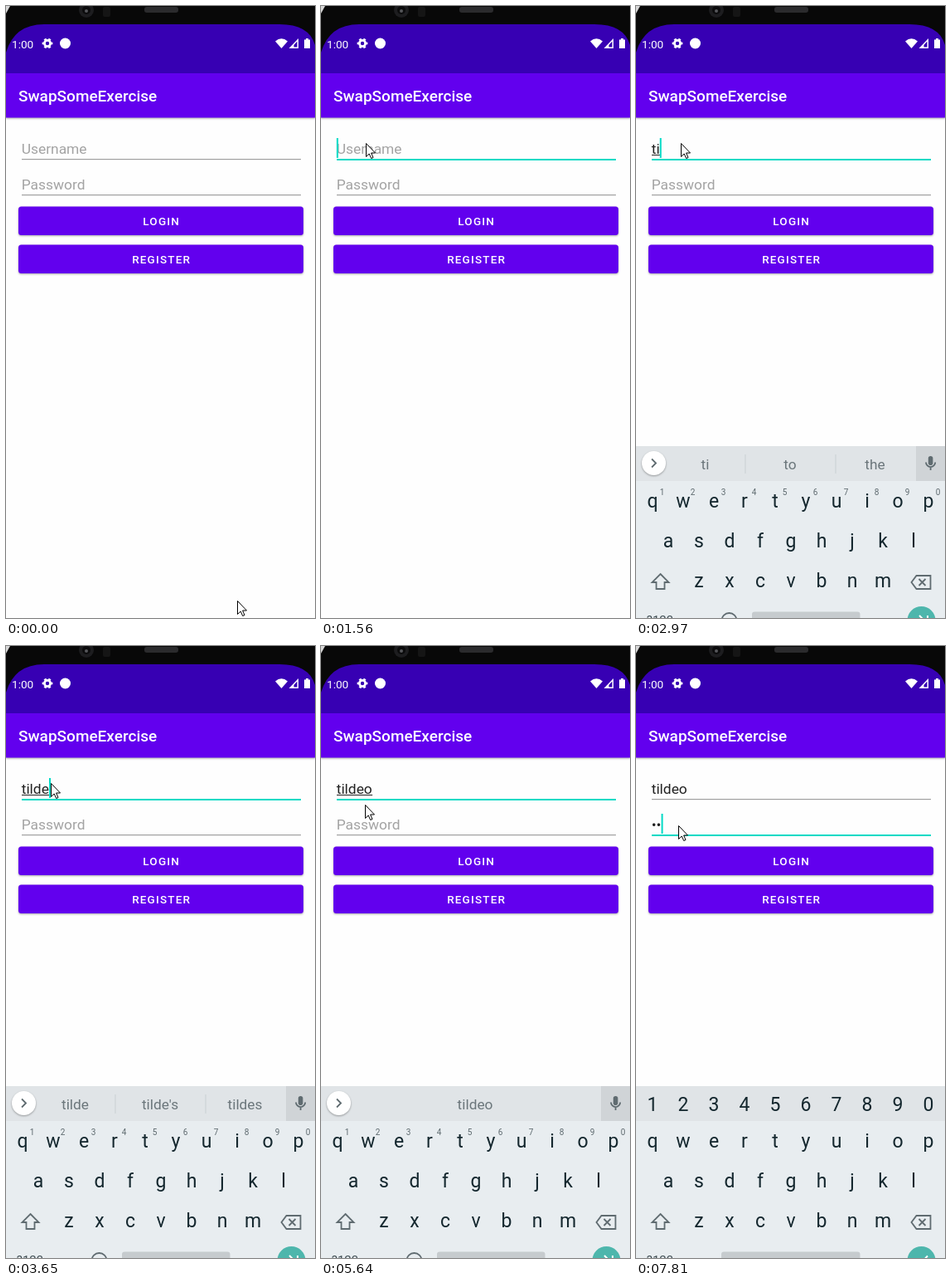
Recreate the animation shown at these times as an HTML page. Size 373x737 px, loop 8000 ms.

```html
<!DOCTYPE html>
<html lang="en">
<head>
<meta charset="utf-8">
<title>Login form</title>
<style>
html, body { margin: 0; width: 100%; height: 100%; overflow: hidden; background: #fefefe; }
svg { display: block; font-family: Roboto, sans-serif; }
text { white-space: pre; }
.mid { text-anchor: middle; }
.field { font-size: 17.4px; fill: #222; }
.hint { font-size: 17.4px; fill: #a3a3a3; }
.button { font-size: 13.5px; font-weight: 500; letter-spacing: 1.2px; fill: #fff; text-anchor: middle; }
.key { font-size: 23px; fill: #14272e; text-anchor: middle; }
.sup { font-size: 10px; fill: #5d696e; text-anchor: middle; }
.word { font-size: 17.3px; fill: #6b767b; text-anchor: middle; }
.line { fill: none; stroke: #5f6b70; stroke-width: 1.8; }
.raised { filter: drop-shadow(0 1px 1px #0005); }
</style>
</head>
<body>
<svg width="373" height="737" viewBox="0 0 373 737">
  <rect width="373" height="737" fill="#fefefe"/>
  <rect class="raised" y="78" width="373" height="56.5" fill="#6200ee"/>
  <rect width="373" height="81" fill="#3700b3"/>
  <path d="M0 0H373V47Q366 22 330 22H46Q10 22 0 56Z" fill="#080808"/>
  <path d="M0 0H5L0 9Z" fill="#d8d8d8"/>
  <circle cx="97" cy="5" r="9" fill="#1d1d1f"/>
  <circle cx="97" cy="5" r="5" fill="#0b0b0c"/>
  <circle cx="97" cy="6" r="2" fill="#55565a"/>
  <rect x="117" y="1" width="9" height="12" rx="2" fill="#151515"/>
  <rect x="167" y="1" width="41" height="7" rx="3" fill="#2b2b2d"/>

  <g fill="#fff">
    <text x="7" y="50.5" font-size="13.6">1:00</text>
    <g fill="none" stroke="#fff">
      <circle cx="50" cy="45" r="3.6" stroke-width="2.8"/>
      <circle cx="50" cy="45" r="5.3" stroke-width="2.2" pathLength="12" stroke-dasharray="1" stroke-dashoffset=".5"/>
    </g>
    <circle cx="71.5" cy="45" r="6.5"/>
    <path d="M325 42.5Q332.500 36 340 42.500L332.500 51Z"/>
    <path d="M341.500 51L353 39V51Z"/>
    <path d="M347.500 47L351.500 42.500V49.500H347.500Z" fill="#3700b3"/>
    <path d="M360 40.500H362V39H365V40.500H367V51H360Z"/>
    <text x="15" y="115.300" font-size="19" font-weight="500">SwapSomeExercise</text>
  </g>

  <text class="hint" id="nameHint" x="18.700" y="177.700">Username</text>
  <text class="field" id="name" x="18.700" y="177.700"></text>
  <rect id="composing" x="19" y="179" height="1" fill="#222"/>
  <text class="hint" id="passHint" x="18.700" y="220.700">Password</text>
  <text class="field" id="pass" x="18.700" y="220.700"></text>
  <rect id="nameLine" x="19" y="184" width="337"/>
  <rect id="passLine" x="19" y="227" width="337"/>
  <rect id="caret" width="2" height="24" fill="#03dac5"/>

  <g class="raised" fill="#6200ee">
    <rect x="15" y="241.500" width="344" height="34.500" rx="3.500"/>
    <rect x="15" y="287.500" width="344" height="34.500" rx="3.500"/>
  </g>
  <text class="button" x="187.700" y="264">LOGIN</text>
  <text class="button" x="187.700" y="310">REGISTER</text>

  <g id="keyboard">
    <rect y="530" width="373" height="207" fill="#e8edf0"/>
    <rect y="530" width="373" height="42" fill="#e0e4e7"/>
    <g id="strip">
      <rect x="338" y="530" width="35" height="42" fill="#d0d4d7"/>
      <rect x="352.800" y="542" width="5.600" height="11" rx="2.800" fill="#5f6b70"/>
      <path class="line" d="M350 549.500a5.600 5.600 0 0 0 11.200 0M355.600 555V559"/>
      <circle class="raised" cx="21.500" cy="550.500" r="14.500" fill="#fff"/>
      <path class="line" id="chevron"/>
      <g id="tools">
        <path class="line" stroke-width="2" d="M74.500 553.500L80 559"/>
        <circle class="line" cx="70" cy="549" r="5.200"/>
        <path class="line" d="M120 543H132Q133.500 543 133.500 545V552L128 558H120.500Q118.500 558 118.500 556V545Q118.500 543 120 543ZM133 552H128V558M122.500 551Q126 555 129 551M122 547H124M128 547H130"/>
        <text class="mid" x="180" y="555" font-size="13" font-weight="900" fill="#5f6b70" letter-spacing=".5">GIF</text>
        <rect x="228" y="543" width="16" height="16" fill="#737e83"/>
        <rect x="268.500" y="541" width="1" height="20" fill="#c9d0d3"/>
        <g fill="#5f6b70"><circle cx="297" cy="551" r="2"/><circle cx="303" cy="551" r="2"/><circle cx="309" cy="551" r="2"/></g>
      </g>
      <path id="dividers" d="M132 540V563M241 540V563" stroke="#c9d0d3"/>
      <text class="word" x="83.500" y="557.500"></text>
      <text class="word" x="186" y="557.500"></text>
      <text class="word" x="288.500" y="557.500"></text>
    </g>
    <g id="digits"></g>
    <g id="letters"></g>
    <g id="superscripts"></g>
    <path class="line" d="M29.500 684L39.500 694H34.500V702H24.500V694H19.500Z"/>
    <path class="line" d="M338.500 686H355.500V702H338.500L332.500 694ZM341.500 690L349.500 698M349.500 690L341.500 698"/>
    <text class="mid" x="29" y="745" font-size="15" fill="#3f4d53">?123</text>
    <circle class="line" id="emoji" cx="112.500" cy="740" r="9"/>
    <rect id="space" y="729.500" height="20" rx="3" fill="#c6cbce"/>
    <circle cx="344.500" cy="740" r="17" fill="#4db6ac"/>
    <path id="enter" fill="none" stroke="#fff" stroke-width="2"/>
  </g>

  <path id="pointer" d="M.5 .5V16.500L4.200 13L6.700 18.500L9 17.500L6.600 12H11.500Z" fill="#fff" stroke="#000"/>
</svg>
<script>
const $ = id => document.getElementById(id);
const words = [...document.querySelectorAll('.word')];
const DOT = '\u2022', TEAL = '#03dac5', GREY = '#a0a0a0';

const keyRow = (chars, x, y, cls = 'key') => [...chars].map((c, i) =>
  `<text class="${cls}" x="${x + i * 37}" y="${y}">${c}</text>`).join('');
$('letters').innerHTML = keyRow('qwertyuiop', 20, 604) + keyRow('asdfghjkl', 39, 652) + keyRow('zxcvbnm', 76, 700);
$('digits').innerHTML = keyRow('1234567890', 20, 560);
$('superscripts').innerHTML = keyRow('1234567890', 31.5, 588.5, 'sup');

// Each track is a list of [start time, value]
const pointer = [[0, [279, 716]], [500, [205, 560]], [620, [82, 312]], [740, [41, 227]],
  [1050, [44, 213]], [1170, [51, 180]], [1290, [54, 165]],
  [5640, [53, 191]], [5770, [52, 211]], [5890, [51, 216]]];
const caretOn = [[0, 0], [1440, 1], [2060, 0], [2580, 1], [4240, 0], [4670, 1], [5360, 0],
  [5890, 1], [7440, 0], [7810, 1]];
const nameText = [[0, ''], [2850, 't'], [2970, 'ti'], [3120, 'til'], [3400, 'tild'], [3650, 'tilde'], [4820, 'tildeo']];
const passText = [[0, ''], [6460, 'n'], [6740, DOT], [6890, DOT + 'o'], [7810, DOT + DOT]];
const suggestions = [[0, []], [2970, ['ti', 'to', 'the']], [3120, ['til', 'till', 'tilt']],
  [3400, ['tild', 'tilde', 'tilts']], [3650, ['tilde', "tilde's", 'tildes']], [4970, ['', 'tildeo', '']]];
const keyboardDrop = [[0, 207], [2060, 90], [2180, 0]];
const focus = [[0, ''], [1440, 'name'], [6040, 'pass']];

const at = (track, t) => track.findLast(([start]) => start <= t)[1];
const set = (id, attrs) => { for (const k in attrs) $(id).setAttribute(k, attrs[k]); };
const show = (id, on) => { $(id).style.display = on ? '' : 'none'; };

function draw(t) {
  const focused = at(focus, t), [px, py] = at(pointer, t);
  const texts = { name: at(nameText, t), pass: at(passText, t) };
  for (const id in texts) {
    $(id).textContent = texts[id];
    show(id + 'Hint', !texts[id]);
    const active = id === focused;
    set(id + 'Line', { fill: active ? TEAL : GREY, height: active ? 2 : 1.2 });
  }
  const width = id => texts[id] ? $(id).getComputedTextLength() : 0;
  set('composing', { width: focused === 'name' ? width('name') : 0 });
  show('caret', at(caretOn, t));
  if (focused) set('caret', { x: 18.8 + width(focused), y: focused === 'name' ? 159 : 202 });

  const numeric = t >= 6160, list = at(suggestions, t), typing = list.length > 0;
  set('keyboard', { transform: `translate(0 ${at(keyboardDrop, t)})` });
  show('strip', !numeric);
  show('superscripts', !numeric);
  show('emoji', !numeric);
  show('digits', numeric);
  show('tools', !typing);
  show('dividers', list[0]);
  words.forEach((w, i) => { w.textContent = list[i] || ''; });
  set('chevron', { d: typing ? 'M19 545.500L24 550.500L19 555.500' : 'M24 545.500L19 550.500L24 555.500' });
  set('space', numeric ? { x: 103, width: 167.500 } : { x: 140, width: 130.500 });
  set('enter', { d: numeric ? 'M337 740L342 745L352 734.500' : 'M342 734L348 740L342 746M352 734V746' });
  set('pointer', { transform: `translate(${px} ${py})` });
}

function tick() {
  draw(performance.now() % 8000);
  requestAnimationFrame(tick);
}
tick();
</script>
</body>
</html>
```
